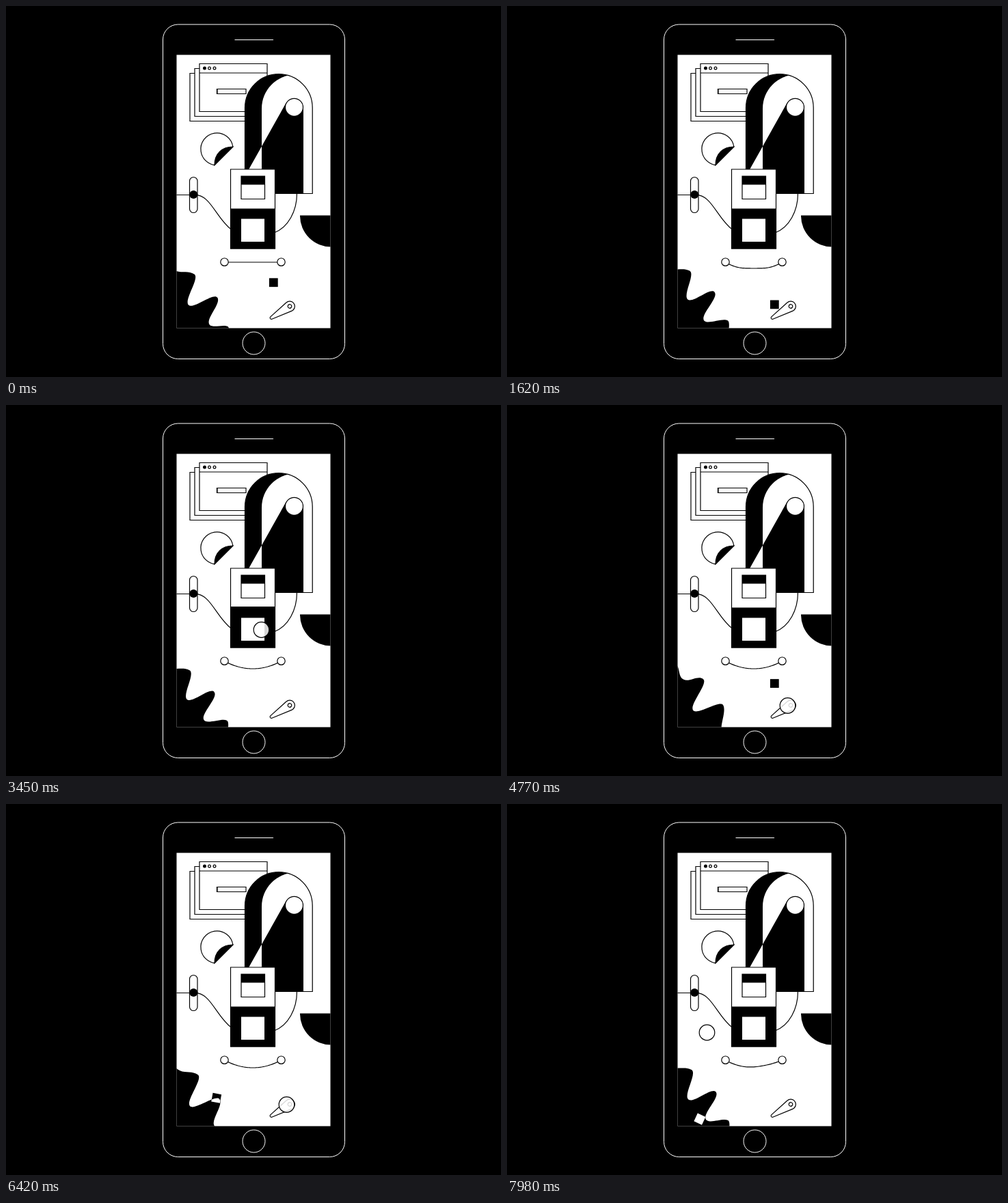
Write an HTML page with a canvas that moves like this. It is 724 by 543 pixels and loops after 8000 ms.

```html
<!DOCTYPE html>
<html lang="en">
<head>
<meta charset="utf-8">
<title>Phone machine</title>
<style>
  html, body { margin: 0; height: 100%; overflow: hidden; background: #000; }
  canvas { display: block; }
</style>
</head>
<body>
<canvas id="stage" width="724" height="543"></canvas>
<script>
const ctx = document.getElementById('stage').getContext('2d');
const LOOP = 8000, TAU = Math.PI * 2, DEG = Math.PI / 180;
const smooth = p => p * p * (3 - 2 * p);

// Keys are rows of [time, ...values].
function sample(keys, t, ease = smooth) {
  if (t <= keys[0][0]) return keys[0].slice(1);
  const i = keys.findIndex(k => k[0] > t);
  if (i < 0) return keys[keys.length - 1].slice(1);
  const a = keys[i - 1], b = keys[i], p = ease((t - a[0]) / (b[0] - a[0]));
  return a.slice(1).map((v, n) => v + (b[n + 1] - v) * p);
}

function paint(fill, stroke) {
  if (fill) { ctx.fillStyle = fill; ctx.fill(); }
  if (stroke) { ctx.strokeStyle = stroke; ctx.stroke(); }
}
function rect(x, y, w, h, fill, stroke, r = 0) {
  ctx.beginPath();
  ctx.roundRect(x, y, w, h, r);
  paint(fill, stroke);
}
function disc(x, y, r, fill, stroke) {
  ctx.beginPath();
  ctx.arc(x, y, r, 0, TAU);
  paint(fill, stroke);
}
function path(d, fill, stroke) {
  const p = new Path2D(d);
  if (fill) { ctx.fillStyle = fill; ctx.fill(p); }
  if (stroke) { ctx.strokeStyle = stroke; ctx.stroke(p); }
}
function isolated(draw) { ctx.save(); draw(); ctx.restore(); }

function phone() {
  ctx.fillStyle = '#000';
  ctx.fillRect(0, 0, 724, 543);
  ctx.lineWidth = 1;
  rect(229.5, 27, 266, 489.5, '#000', '#fff', 22);
  path('M334.5 49.5H391', null, '#fff');
  disc(362.5, 493.5, 16.5, null, '#fff');
  ctx.fillStyle = '#fff';
  ctx.fillRect(249.5, 71.5, 225, 400);
}

function windows() {
  for (let i = 0; i < 3; i++) rect(269 + 7 * i, 98.5 - 7 * i, 99, 70, '#fff', '#000');
  path('M283 98H382', null, '#000');
  [290.5, 297.5, 305].forEach((x, i) => disc(x, 91, 1.9, i ? '#fff' : '#000', '#000'));
  rect(308.5, 121.5, 42.5, 7, '#fff', '#000');
  path('M309 121V129', null, '#000');
}

function arch() {
  const outline = new Path2D('M349.5 274.5V149A49.3 49.3 0 0 1 448.2 149V274.5Z');
  isolated(() => {
    ctx.clip(outline);
    path('M340 90H460V280H340Z', '#000');
    path('M374 280V150A49.5 49.5 0 0 1 423.5 100.5H470V280Z', '#fff');
    ctx.globalCompositeOperation = 'difference';
    path('M409.5 142L334.5 276H435V148Z', '#fff');
  });
  ctx.strokeStyle = '#000';
  ctx.stroke(outline);
  disc(421.5, 148.3, 13, '#fff', '#000');
}

function sticker() {
  ctx.beginPath();
  ctx.arc(308.5, 209.5, 23.6, -8.5 * DEG, 98.5 * DEG, true);
  paint('#fff', '#000');
  path('M332 206C316 206 305 216 305 233Z', '#000', '#000');
}

function sliderAndCable() {
  rect(268.5, 250.5, 11.5, 52, '#fff', '#000', 5.75);
  path('M249 276.5H274C299 274 307 311 330 327.5M392 332C413 324 425.5 300 425.5 274', null, '#000');
  disc(274.3, 276, 6, '#000');
}

function boxes(t) {
  const divider = t > 3250 && t < 3650 ? 295 : 296.5;
  rect(328.5, 239, 65, 116, '#fff', '#000');
  ctx.fillStyle = '#000';
  ctx.fillRect(328, divider, 66, 355.5 - divider);
  rect(344, 249, 34.5, 33.5, '#fff', '#000');
  ctx.fillStyle = '#000';
  ctx.fillRect(344, 249, 34.5, 12.5);
  ctx.fillStyle = '#fff';
  ctx.fillRect(344, 311.5, 34, 33.5);
}

// Turns one tooth (24 degrees) every 900 ms; teeth are deepest on the diagonal.
function gear(t) {
  const cx = 211.5, cy = 489.3, phase = -56.6 + (t % 900) / 900 * 24;
  const node = (deg, r) => {
    const c = Math.cos(deg * DEG), s = Math.sin(deg * DEG);
    return { x: cx + r * c, y: cy + r * s, hx: -s * 10, hy: c * 10 };
  };
  const nodes = [];
  for (let k = -3; k < 4; k++) {
    const peak = phase + 24 * k;
    const valley = peak + 14.3 + 0.13 * (peak + 50);
    nodes.push(node(peak, 116));
    nodes.push(node(valley, Math.min(108, 74 + 0.037 * (valley + 36) ** 2)));
  }
  ctx.beginPath();
  ctx.moveTo(cx, cy);
  ctx.lineTo(nodes[0].x, nodes[0].y);
  for (let i = 1; i < nodes.length; i++) {
    const a = nodes[i - 1], b = nodes[i];
    ctx.bezierCurveTo(a.x + a.hx, a.y + a.hy, b.x - b.hx, b.y - b.hy, b.x, b.y);
  }
  paint('#000');
}

// Sag, sway and ripple of the rope.
const ropeKeys = [
  [0, 0, 0, 0], [120, 15, 1, 0], [250, 8, -1, 0], [380, 12.5, 0, 0], [560, 11, 0, 0],
  [1500, 11, 0, 0], [1620, 9.8, 0, .8], [1760, 11, 0, 0],
  [5670, 11, 0, 0], [5730, -4, -1.3, 3.2], [5830, 14, 1, -1], [5950, 8, 0, .6], [6100, 12, 0, 0], [6300, 11, 0, 0],
  [6940, 11, 0, 0], [7000, -4, -1.3, 3.2], [7080, 7.4, 0, .7], [7180, 14, 0, 0], [7300, 8, 0, .6],
  [7420, 12, 0, 0], [7600, 11, 0, 0], [7850, 11, 0, 0], [7980, 9.8, .8, 0]
];
function rope(t) {
  const [sag, sway, ripple] = sample(ropeKeys, t);
  ctx.beginPath();
  for (let u = 0; u <= 1.001; u += 1 / 42) {
    ctx.lineTo(319.5 + 83 * u, 375 + sag * 4 * u * (1 - u)
      + sway * Math.sin(TAU * u) + ripple * Math.sin(1.5 * TAU * u));
  }
  paint(null, '#000');
  for (const x of [319.5, 402.5]) disc(x, 374.7, 5.7, '#fff', '#000');
}

const drops = [-122, 1467, 3056, 4645], shots = [5409, 6679], HIT = 161;
const shotKeys = [[HIT, 391, 446, 0], [281, 375, 381, 4], [321, 371, 384, 8], [401, 362, 404, -20]];

function block(x, y, deg = 0) {
  isolated(() => {
    ctx.globalCompositeOperation = 'difference';
    ctx.translate(x, y);
    ctx.rotate(deg * DEG);
    ctx.fillStyle = '#fff';
    ctx.fillRect(-6.4, -6.4, 12.8, 12.8);
  });
}
function blocks(t) {
  const fall = age => block(391.3, 348 + 0.00375 * age * age);
  for (const start of drops) {
    const age = t - start;
    if (age >= 0 && age < 200) fall(age);
  }
  for (const start of shots) {
    const age = t - start;
    if (age < 0 || age > 1500) continue;
    if (age < HIT) fall(age);
    else if (age < 401) block(...sample(shotKeys, age, p => p));
    else {
      const p = (age - 401) / 900;
      block(362 - 80 * p, 404 + 57 * p * p, -20 + 45 * p);
    }
  }
}

function flipper(t) {
  let swing = 0;
  for (const start of shots) {
    const p = (t - start - HIT) / 150;
    if (p > 0 && p < 1) swing = 30 * Math.sin(Math.PI * p);
  }
  isolated(() => {
    ctx.translate(415, 439.5);
    ctx.rotate((147.8 + swing) * DEG);
    ctx.beginPath();
    ctx.arc(0, 0, 7.4, 80 * DEG, 280 * DEG);
    ctx.arc(31.7, 0, 2, -80 * DEG, 80 * DEG);
    ctx.closePath();
    paint('#fff', '#000');
    disc(0, 0, 2.8, null, '#000');
  });
}

const cursorKeys = [
  [1900, 490, 352], [2900, 373.5, 329], [3650, 373.5, 329],
  [4400, 410.5, 440], [7300, 410.5, 440], [7980, 292.5, 334.5]
];
function cursor(t) {
  const [x, y] = sample(cursorKeys, t);
  disc(x, y, 11.3, 'rgba(255,255,255,.84)', '#000');
}

function draw(t) {
  phone();
  isolated(() => {
    ctx.beginPath();
    ctx.rect(249.5, 71.5, 225, 400);
    ctx.clip();
    ctx.lineWidth = 1.2;
    windows();
    arch();
    sticker();
    sliderAndCable();
    path('M430 306.5H476V352.5A45.5 45.5 0 0 1 430 306.5Z', '#000');
    gear(t);
    blocks(t);
    boxes(t);
    rope(t);
    flipper(t);
    cursor(t);
  });
}

const began = performance.now();
function tick() {
  draw((performance.now() - began) % LOOP);
  requestAnimationFrame(tick);
}
tick();
</script>
</body>
</html>
```
